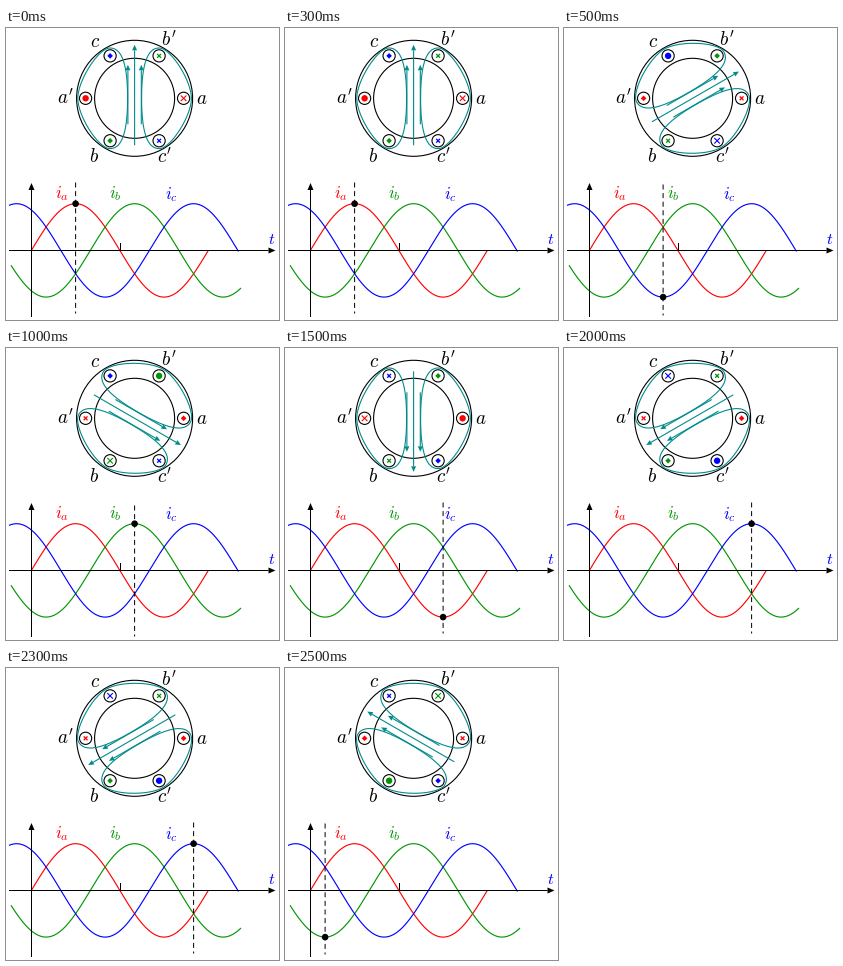
Recreate the animation shown at these times as a matplotlib script. Size 273 by 292 pixels, loop 3000 ms.

```python
import numpy as np
import matplotlib.pyplot as plt
from matplotlib.animation import FuncAnimation
from matplotlib.patches import Circle, Polygon, RegularPolygon

W, H, DPI = 273, 292, 100
PX = 72 / DPI                       # points per pixel
RED, GREEN, BLUE, TEAL = "#ff0000", "#009600", "#0000ff", "#008b8b"

plt.rcParams["mathtext.fontset"] = "cm"
fig = plt.figure(figsize=(W / DPI, H / DPI), dpi=DPI, facecolor="white")
ax = fig.add_axes([0, 0, 1, 1])
ax.set_xlim(0, W)
ax.set_ylim(H, 0)
ax.axis("off")

# stator geometry
CENTER = np.array([128.6, 70.3])
R_OUT, R_IN, R_SLOT = 58, 40, 49

# graph geometry
X0, Y0, PERIOD, AMP = 25.35, 222.4, 177, 46.7
STEPS = 6
DASH_TOPS = [154.5, 156.5, 157.5, 154.5, 154.5, 155.5]
DASH_LEN = 131

# phase: colour, lag in turns, angles of its two slots (degrees, clockwise)
PHASES = [(RED, 0, 0, 180), (GREEN, 1 / 3, 120, 300), (BLUE, 2 / 3, 240, 60)]


def line(x, y, color="black", width=1.0, z=2, **kw):
    return ax.plot(x, y, color=color, lw=width * PX, zorder=z, snap=False,
                   solid_capstyle="butt", **kw)[0]


def disc(xy, r, color):
    return ax.add_patch(Circle(xy, r, fc=color, ec="none", zorder=5))


def diamond(xy, r, color):
    return ax.add_patch(RegularPolygon(xy, 4, radius=r, fc=color,
                                       ec="none", zorder=5))


def ring(xy, r, width=1.1):
    ax.add_patch(Circle(xy, r, fill=False, ec="black", lw=width * PX, zorder=2))


def arrow(start, tip, color="black", head=7, half=3.0, width=1.0, z=3):
    start, tip = np.array(start, float), np.array(tip, float)
    d = (tip - start) / np.hypot(*(tip - start))
    n = np.array([-d[1], d[0]])
    base = tip - head * d
    shaft = line(*np.array([start, base]).T, color, width, z)
    cap = ax.add_patch(Polygon([tip, base + half * n, base - half * n],
                               fc=color, ec="none", zorder=z))
    return [shaft, cap]


def label(x, y, text, px, color="black"):
    ax.text(x, y, f"${text}$", fontsize=px * PX, color=color,
            ha="left", va="baseline", zorder=6)


def slot(deg):
    a = np.radians(deg)
    return CENTER + R_SLOT * np.array([np.cos(a), np.sin(a)])


def current(x, lag):
    return np.sin(2 * np.pi * ((x - X0) / PERIOD - lag))


def bezier(*points):
    p0, p1, p2, p3 = np.array(points, float)
    t = np.linspace(0, 1, 50)[:, None]
    return ((1 - t) ** 3 * p0 + 3 * t * (1 - t) ** 2 * p1
            + 3 * t ** 2 * (1 - t) * p2 + t ** 3 * p3)


def field_loop():
    """Left flux loop for an upright field, centred on the origin."""
    crest = (-25, -50.3)
    outer = bezier((-56.8, 0), (-56.8, -18), (-36, -50), crest)
    inner = bezier(crest, (-12, -50.7), (-7, -32), (-7, 0))
    top = np.vstack([outer, inner[1:]])
    return np.vstack([top, top[::-1] * [1, -1]])


def turn(points, deg):
    c, s = np.cos(np.radians(deg)), np.sin(np.radians(deg))
    return np.asarray(points) @ np.array([[c, s], [-s, c]]) + CENTER


def draw_static():
    ring(CENTER, R_OUT)
    ring(CENTER, R_IN)
    for deg in range(0, 360, 60):
        ring(slot(deg), 6.1)
    label(190, 75.5, "a", 19)
    label(50.8, 75.8, "a'", 19)
    label(83.5, 19.2, "c", 19)
    label(155.3, 18.2, "b'", 19)
    label(83, 134.3, "b", 19)
    label(151.3, 134.5, "c'", 19)

    axis_x, axis_y = 25.5, 222.5
    arrow((3, axis_y), (269.5, axis_y))
    arrow((axis_x, 289), (axis_x, 155))
    line([114.5, 114.5], [215, axis_y])
    spans = [(X0, X0 + PERIOD), (5, 235), (3, 232.5)]
    for (color, lag, *_), (a, b) in zip(PHASES, spans):
        x = np.linspace(a, b, 300)
        line(x, Y0 - AMP * current(x, lag), color, 1.15)
    label(48.6, 169.8, "i_a", 17, RED)
    label(103.3, 169.8, "i_b", 17, GREEN)
    label(159, 170.8, "i_c", 17, BLUE)
    label(262.3, 216.5, "t", 16, BLUE)


def mark(deg, inward, big, color):
    x, y = slot(deg)
    if not inward:
        return [disc((x, y), 3.2, color) if big else diamond((x, y), 2.8, color)]
    h, w = (2.8, 1.1) if big else (1.9, 1.3)
    return [line([x - h, x + h], [y - h * s, y + h * s], color, w, 5)
            for s in (1, -1)]


LOOP = field_loop()
live = []


def clear():
    while live:
        live.pop().remove()


def update(i):
    clear()
    deg = 60 * i

    for side in (1, -1):
        live.append(line(*turn(LOOP * [side, 1], deg).T, TEAL, 1.1, 3))
    for x, tail, tip in ((-6.7, 26, -33.5), (0, 47, -53.5), (6.7, 26, -33.5)):
        live.extend(arrow(*turn([(x, tail), (x, tip)], deg),
                          color=TEAL, head=5.5, half=2.5, width=1.1, z=4))

    # the sampling instant advances a sixth of a period each step
    x = X0 + PERIOD * (0.25 + i / STEPS)
    if x > X0 + PERIOD:
        x -= PERIOD
    for color, lag, go, back in PHASES:
        value = current(x, lag)
        big = abs(value) > 0.9
        live.extend(mark(go, value > 0, big, color))
        live.extend(mark(back, value < 0, big, color))
        if big:
            live.append(disc((x, Y0 - AMP * value), 3.3, "black"))
    top = DASH_TOPS[i]
    live.append(line([x, x], [top, top + DASH_LEN], z=4,
                     ls=(0, (5, 3.6)), dash_capstyle="butt"))
    return live


draw_static()
anim = FuncAnimation(fig, update, frames=STEPS, interval=500,
                     init_func=clear, repeat=True, repeat_delay=0, blit=False)
plt.show()
```
